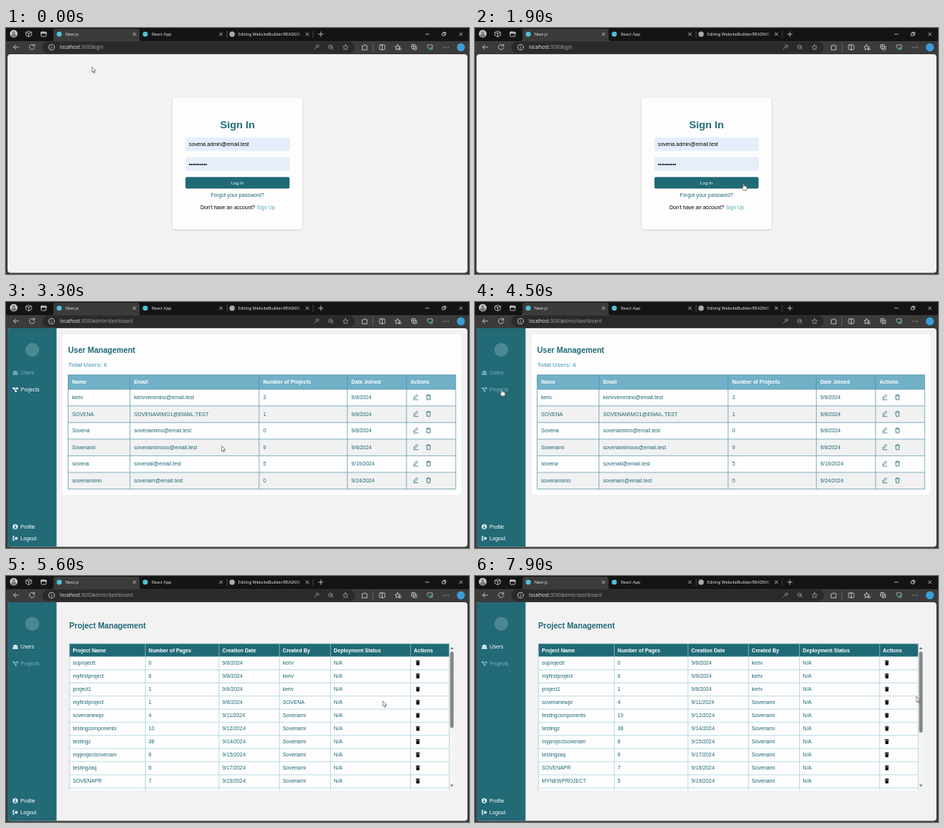
Write an HTML page that moves like this. It is 600x319 px and loops after 8 s.

```html
<!DOCTYPE html>
<html lang="en">
<head>
<meta charset="utf-8">
<title>Admin dashboard</title>
<style>
html, body { margin: 0; width: 100%; height: 100%; overflow: hidden; background: #3b3b3b; }
svg { display: block; width: 100%; height: 100%; }
text { font: 6.77px "Liberation Sans", Arial, sans-serif; white-space: pre; }
.ui { font-family: "Open Sans", "Noto Sans", sans-serif; font-size: 5.4px; fill: #eee; }
.url { font-size: 6.2px; }
.b { font-weight: bold; font-size: 6.73px; }
.teal { fill: #1f6975; }
.line { fill: none; stroke: #d4d4d4; stroke-width: .8; stroke-linecap: round; stroke-linejoin: round; }
.nav { fill: #fff; }

/* One 8 s clock; every scene change is a hard cut */
.scene, .nav, #cursor, #arrow, #hand { animation: 8s step-end infinite; }
#login, #urlLogin { animation-name: login; }
#dash, #urlDash { animation-name: dash; }
#usersEmpty { animation-name: usersEmpty; }
#usersFull { animation-name: usersFull; }
#projBefore { animation-name: projBefore; }
#projAfter { animation-name: projAfter; }
#projPage { animation-name: projPage; }
#navUsers { animation-name: navUsers; }
#navProjects { animation-name: navProjects; }
#arrow { animation-name: arrow; }
#hand { animation-name: hand; }
#cursor { animation-name: travel; }

@keyframes login { 0% { opacity: 1 } 27.5%, 100% { opacity: 0 } }
@keyframes dash { 0% { opacity: 0 } 27.5%, 100% { opacity: 1 } }
@keyframes usersEmpty { 0% { opacity: 0 } 27.5% { opacity: 1 } 33.75%, 100% { opacity: 0 } }
@keyframes usersFull { 0% { opacity: 0 } 33.75% { opacity: 1 } 60%, 100% { opacity: 0 } }
@keyframes projPage { 0% { opacity: 0 } 60%, 100% { opacity: 1 } }
@keyframes projBefore { 0% { opacity: 0 } 60% { opacity: 1 } 93.75%, 100% { opacity: 0 } }
@keyframes projAfter { 0% { opacity: 0 } 93.75%, 100% { opacity: 1 } }
@keyframes navUsers { 0% { fill: #78b3c0 } 60%, 100% { fill: #fff } }
@keyframes navProjects { 0% { fill: #fff } 55%, 100% { fill: #78b3c0 } }
@keyframes arrow {
  0% { opacity: 1 } 15% { opacity: 0 } 16.25% { opacity: 1 } 22.5% { opacity: 0 } 27.5% { opacity: 1 }
  46.25% { opacity: 0 } 50% { opacity: 1 } 55% { opacity: 0 } 60% { opacity: 1 }
  78.75% { opacity: 0 } 82.5%, 100% { opacity: 1 }
}
@keyframes hand {
  0% { opacity: 0 } 22.5% { opacity: 1 } 27.5% { opacity: 0 } 46.25% { opacity: 1 } 50% { opacity: 0 }
  55% { opacity: 1 } 60% { opacity: 0 } 78.75% { opacity: 1 } 82.5%, 100% { opacity: 0 }
}
@keyframes travel {
  0% { transform: translate(111px, 50px); animation-timing-function: steps(6) }
  7.5% { transform: translate(304px, 225px) }
  8.75% { transform: translate(304px, 225px); animation-timing-function: steps(3) }
  12.5% { transform: translate(595px, 229px) }
  16.25% { transform: translate(590px, 240px); animation-timing-function: steps(6) }
  23.75% { transform: translate(348px, 201px) }
  27.5% { transform: translate(348px, 201px); animation-timing-function: steps(11) }
  41.25% { transform: translate(279px, 186px); animation-timing-function: steps(4) }
  46.25% { transform: translate(533px, 165px); animation-timing-function: steps(2) }
  48.75% { transform: translate(529px, 124px); animation-timing-function: steps(3) }
  52.5% { transform: translate(290px, 170px); animation-timing-function: steps(3) }
  56.25% { transform: translate(34.5px, 112.5px) }
  58.75% { transform: translate(34.5px, 112.5px); animation-timing-function: steps(9) }
  70% { transform: translate(488px, 161.5px); animation-timing-function: steps(8) }
  80% { transform: translate(535px, 162px); animation-timing-function: steps(11) }
  91.25% { transform: translate(383px, 191px); animation-timing-function: steps(7) }
  98.75%, 100% { transform: translate(571.5px, 156px) }
}
</style>
</head>
<body>
<svg id="stage" viewBox="0 0 600 319" preserveAspectRatio="none">
  <defs>
    <clipPath id="page"><rect x="2" y="34" width="596" height="283.5" rx="4"/></clipPath>
    <clipPath id="list"><rect x="81" y="86" width="494" height="191.5"/></clipPath>
    <linearGradient id="fade" gradientUnits="userSpaceOnUse" x1="374" x2="386" y1="0" y2="0">
      <stop stop-color="#eee"/><stop offset="1" stop-color="#eee" stop-opacity=".15"/>
    </linearGradient>
    <filter id="soft" x="-10%" y="-10%" width="120%" height="120%">
      <feDropShadow dx="0" dy="1" stdDeviation="1.5" flood-opacity=".13"/>
    </filter>
    <path id="x" d="M-1.8-1.8 1.8 1.8M1.8-1.8-1.8 1.8"/>
    <path id="star" d="M0-3.5 1-1.1 3.5-.9 1.6.8 2.2 3.3 0 2-2.2 3.3-1.6.8-3.5-.9-1-1.1Z"/>
    <g id="pencil" fill="none" stroke="#1f6975" stroke-width=".75">
      <path d="M-2.6 1.7-2.1-.2 1.3-3.4 2.7-2-.8 1.3ZM-3 3.3H3.2"/>
    </g>
    <path id="bin" fill="none" stroke="#1f6975" stroke-width=".75" d="M-3-2.2H3M-1-2.3V-3.2H1V-2.3M-2.2-2.1-1.9 3.2H1.9L2.2-2.1"/>
    <path id="trash" d="M-2.6-2.8H-1L-.7-3.3H.7L1-2.8H2.6V-1.9H-2.6ZM-2.2-1.4H2.2L1.9 3.1H-1.9Z"/>
  </defs>

  <!-- browser frame -->
  <rect width="600" height="319" fill="#3b3b3b"/>
  <rect width="600" height="17" fill="#141414"/>
  <path d="M59 17Q61.500 17 61.500 14V4Q61.500 1 64.500 1H170Q173 1 173 4V14Q173 17 175.500 17Z" fill="#3b3b3b"/>
  <circle cx="10" cy="7.500" r="5" fill="#c9c9c9"/>
  <path d="M6.500 10.500a3.500 3 0 0 1 7 0a5 5 0 0 1-7 0Z" fill="#777"/><circle cx="10" cy="6" r="1.800" fill="#777"/>
  <g class="line">
    <path d="M26 5.500 29.500 4 33 5.500V9.500L29 11.500 26 9.500ZM26.500 5.700 29.500 7 33 5.500M29.500 7V11"/>
    <rect x="45.500" y="5" width="6.500" height="6" rx="1"/><path d="M45.500 6.400H52" stroke-width="1.800"/>
    <use href="#x" x="166.500" y="8"/><use href="#x" x="278.500" y="8"/><use href="#x" x="390.500" y="8"/>
    <path d="M286.500 4V12.500M398 4V12.500" stroke="#555"/>
    <path d="M405 8H411M408 5V11M543.800 8H548.200M565.500 6.800H568.800V10H565.500ZM566.800 6.500V5.500H570V8.700H569"/>
    <use href="#x" x="589.500" y="8"/>
  </g>
  <circle cx="69" cy="8" r="3.300" fill="#55bfd6"/>
  <circle cx="180.500" cy="8" r="3.300" fill="#55bfd6"/>
  <circle cx="293" cy="8" r="3.500" fill="#aaa"/>
  <text class="ui" x="77" y="10">Next.js</text>
  <text class="ui" x="189" y="10">React App</text>
  <text class="ui" x="301" y="10" style="fill:url(#fade)">Editing WebsiteBuilder/README.</text>

  <rect x="47" y="17.500" width="405" height="15" rx="7.500" fill="#2a2a2a"/>
  <g class="line">
    <path d="M10 24.800H16.500M12.700 22 9.800 24.800 12.700 27.600"/>
    <path d="M36.600 22.800A3.400 3.400 0 1 0 37.100 25.500M37 21V23.300H34.700"/>
    <circle cx="59" cy="25" r="3.700"/><path d="M59 24.800V26.800M59 23V23.100"/>
    <g stroke="#999"><circle cx="403.500" cy="23.500" r="1.700"/><path d="M402.200 24.800 399.500 27.500"/>
      <circle cx="420.500" cy="24.500" r="2.500"/><path d="M422.500 26.500 424 28M419.400 24.500H421.600"/><use href="#star" x="440" y="25"/></g>
    <path d="M462 23H464A1.200 1.200 0 0 1 466.400 23H468V25A1.200 1.200 0 0 0 468 27V28.300H462Z"/>
    <path d="M475.500 20V30" stroke="#666"/>
    <rect x="484" y="22" width="7" height="6" rx="1"/><path d="M487.500 21.500V28.500"/>
    <use href="#star" x="507.500" y="25"/><path d="M509.500 26.200H512M509.500 28H512"/>
    <rect x="525.500" y="21.500" width="5" height="5" rx="1"/><path d="M527.500 28H532V23.500M526.700 24H529.300M528 22.700V25.300"/>
    <path d="M549.500 28 546.300 24.800A1.900 1.900 0 0 1 549.500 22.500 1.900 1.900 0 0 1 552.700 24.800Z"/>
    <path d="M567 25H567.100M570 25H570.100M573 25H573.100" stroke-width="1.200"/>
  </g>
  <circle cx="551.500" cy="26.500" r="2" fill="#3aa55d"/>
  <circle cx="589.500" cy="25" r="5.200" fill="#3a9fd8"/>
  <text class="ui url" x="70" y="27.200">localhost<tspan fill="#a5a5a5">:3000/</tspan></text>
  <text id="urlLogin" class="ui url scene" x="112.200" y="27.200" style="fill:#a5a5a5">login</text>
  <text id="urlDash" class="ui url scene" x="112.200" y="27.200" style="fill:#a5a5a5">admin/dashboard</text>

  <g clip-path="url(#page)">
    <rect y="34" width="600" height="285" fill="#f3f2f3"/>

    <g id="login" class="scene">
      <rect x="216" y="90.500" width="168" height="170.500" rx="3.500" fill="#fdfdfe" filter="url(#soft)"/>
      <text class="teal" x="300" y="130.300" text-anchor="middle" style="font-size:13.500px;font-weight:bold">Sign In</text>
      <rect x="232.500" y="142" width="135.500" height="17.500" rx="1.800" fill="#e6eefb"/>
      <rect x="232.500" y="167.500" width="135.500" height="17.500" rx="1.800" fill="#e6eefb"/>
      <text x="237" y="152.800">sovena.admin@email.test</text>
      <text x="237" y="178.600">••••••••••</text>
      <rect x="232.500" y="193.300" width="135" height="15" rx="1.800" fill="#206a76"/>
      <text x="300" y="202.800" text-anchor="middle" fill="#fff" style="font-size:5.700px">Log In</text>
      <text class="teal" x="300" y="218.600" text-anchor="middle">Forgot your password?</text>
      <text x="252" y="235.200">Don't have an account? <tspan fill="#5bb0b3">Sign Up</tspan></text>
    </g>

    <g id="dash" class="scene">
      <rect x="2" y="34" width="63.500" height="285" fill="#226a76"/>
      <circle cx="34" cy="62" r="9" fill="#4b8992"/>
      <g id="navUsers" class="nav">
        <circle cx="10.300" cy="90.800" r="1.100"/><circle cx="14" cy="90.800" r="1.100"/><circle cx="12.100" cy="90.500" r="1.400"/>
        <path d="M8.500 94.500a1.800 2 0 0 1 2-2.200h3.200a1.800 2 0 0 1 2 2.200Z"/>
        <text x="19" y="94.300">Users</text>
      </g>
      <g id="navProjects" class="nav">
        <path d="M8.500 110.800h2.400v.8h2.400v-.8h2.400v2.400h-2.400v-.7h-1.900l1.300 2.100h1.100v2.200h-2.300v-2l-1.500-2h-1.500Z"/>
        <text x="19" y="116">Projects</text>
      </g>
      <g fill="#fff">
        <circle cx="12" cy="291.500" r="3.300"/>
        <text x="18.700" y="293.900">Profile</text>
        <path d="M11 303.500H8.800v6H11v-1H9.900v-4H11ZM11 305.700h1.800v-1.600l2.900 2.500-2.900 2.500v-1.700H11Z"/>
        <text x="18.700" y="308.700">Logout</text>
        <path d="M10 293.500a2 1.700 0 0 1 4 0Z" fill="#226a76"/><circle cx="12" cy="290.500" r="1" fill="#226a76"/>
      </g>
      <g id="usersEmpty" class="scene"></g>
      <g id="usersFull" class="scene"></g>
      <g id="projPage" class="scene">
        <text class="teal" x="82" y="68.300" style="font-size:10.150px;font-weight:bold">Project Management</text>
        <rect x="574.500" y="89" width="6.500" height="187" fill="#f5f5f5"/>
        <path d="M575.500 95 577.800 92 580.100 95ZM575.500 270.500 577.800 273.500 580.100 270.500Z" fill="#777"/>
        <g clip-path="url(#list)">
          <g id="projBefore" class="scene"></g>
          <g id="projAfter" class="scene"></g>
        </g>
      </g>
    </g>
  </g>

  <!-- thumb lies outside the clipped list -->
  <g fill="#858585">
    <rect class="scene" style="animation-name:projBefore" x="575.500" y="98" width="4.600" height="99" rx="2.300"/>
    <rect class="scene" style="animation-name:projAfter" x="575.500" y="98" width="4.600" height="105" rx="2.300"/>
  </g>

  <g id="cursor" stroke-linejoin="round">
    <path id="arrow" d="M.3.300V7.500L1.900 6 3 8.500 4.200 8 3.100 5.600H5.300Z" fill="#fff" stroke="#333" stroke-width=".6"/>
    <path id="hand" d="M-.8 1Q0-.2.800 1V4Q1.600 3.200 2.200 4.100 3 3.500 3.500 4.500 4.600 4.200 4.600 5.500V7.500L3.700 9.500H.2L-2.400 6.500Q-2.300 5-.8 6.200Z" fill="#fff" stroke="#222" stroke-width=".6"/>
  </g>
</svg>
<script>
const byId = id => document.getElementById(id);
const rect = (x, y, w, h, attrs) => `<rect x="${x}" y="${y}" width="${w}" height="${h}" ${attrs}/>`;
const label = (x, y, s, attrs) => `<text x="${x}" y="${y}" ${attrs}>${s}</text>`;
const icon = (name, x, y) => `<use href="#${name}" x="${x}" y="${y}"/>`;

// xs: column edges, pad: text inset, icons: [name, x] pairs for the last column
function table({ xs, top, head, step, pad, heads, rows, headFill, line, tint, icons }) {
  const left = xs[0], right = xs[xs.length - 1], body = top + head;
  const bottom = body + step * rows.length;
  let out = rect(left, top, right - left, bottom - top, 'fill="#fdfdfe"')
    + rect(left, top, right - left, head, `fill="${headFill}"`);
  heads.forEach((s, c) => out += label(xs[c] + pad, top + head / 2 + 2.3, s, 'class="b" fill="#fff"'));
  let grid = `M${left} ${top}H${right}M${left} ${body}H${right}`;
  rows.forEach((row, r) => {
    const y = body + r * step, mid = y + step / 2;
    if (r % 2) out += rect(left, y, right - left, step, `fill="${tint}"`);
    row.forEach((s, c) => out += label(xs[c] + pad, mid + 2.1, s, 'class="teal"'));
    icons.forEach(([name, x]) => out += icon(name, x, mid - .5));
    grid += `M${left} ${y + step}H${right}`;
  });
  xs.forEach(x => grid += `M${x} ${top}V${bottom}`);
  return out + `<path d="${grid}" fill="none" stroke="${line}" stroke-width=".65"/>`;
}

function usersPage(cardHeight, xs, rows) {
  return rect(73.5, 42, 516.5, cardHeight, 'rx="3.5" fill="#fefefe"')
    + label(80.5, 66.3, 'User Management', 'class="teal" style="font-size:10.1px;font-weight:bold"')
    + label(80.7, 84.3, `Total Users: ${rows.length}`, 'fill="#6cafc6" style="font-size:7.7px;font-weight:bold"')
    + table({
      xs, rows, top: 94.5, head: 18.7, step: 21.55, pad: 5.2,
      heads: ['Name', 'Email', 'Number of Projects', 'Date Joined', 'Actions'],
      headFill: '#71b0c7', line: '#4b8f9f', tint: '#f1f1f2',
      icons: [['pencil', 531], ['bin', 547.5]]
    });
}

const mail = '@email.test';
const users = [
  ['keriv', 'kerivvemmino' + mail, 3, '9/8/2024'],
  ['SOVENA', 'SOVENAMIMO1' + mail.toUpperCase(), 1, '9/8/2024'],
  ['Sovena', 'sovenamimo' + mail, 0, '9/8/2024'],
  ['Sovenami', 'sovenamimooo' + mail, 9, '9/8/2024'],
  ['sovena', 'sovenati' + mail, 5, '9/19/2024'],
  ['sovenamimo', 'sovenam' + mail, 0, '9/24/2024']
];
byId('usersEmpty').innerHTML = usersPage(78.5, [80.5, 148.5, 214.8, 385.8, 500.3, 582.8], []);
byId('usersFull').innerHTML = usersPage(208, [80.5, 160.7, 328, 442.3, 519, 582.8], users);

const projects = [
  ['soprojectt', 0, 8, 'keriv'],
  ['myfirstproject', 6, 8, 'keriv'],
  ['project1', 1, 8, 'keriv'],
  ['myfirstproject', 1, 8, 'SOVENA'],
  ['sovenanewpr', 4, 11, 'Sovenami'],
  ['testingcomponents', 10, 12, 'Sovenami'],
  ['testingz', 38, 14, 'Sovenami'],
  ['myprojectsovenam', 8, 15, 'Sovenami'],
  ['testingzaq', 6, 17, 'Sovenami'],
  ['SOVENAPR', 7, 19, 'Sovenami'],
  ['MYNEWPROJECT', 5, 19, 'Sovenami'],
  ['testingnew', 2, 19, 'Sovenami']
].map(([name, pages, day, by]) => [name, pages, `9/${day}/2024`, by, 'N/A']);

const projectTable = rows => table({
  xs: [82.2, 180.5, 276, 354.3, 420.5, 524.3, 574.3], rows,
  top: 87.8, head: 16.8, step: 17.03, pad: 4.3,
  heads: ['Project Name', 'Number of Pages', 'Creation Date', 'Created By', 'Deployment Status', 'Actions'],
  headFill: '#206a76', line: '#9bcbd9', tint: '#fdfdfe', icons: [['trash', 533.7]]
});
byId('projBefore').innerHTML = projectTable(projects);
byId('projAfter').innerHTML = projectTable(projects.filter((_, i) => i !== 3));
</script>
</body>
</html>
```
